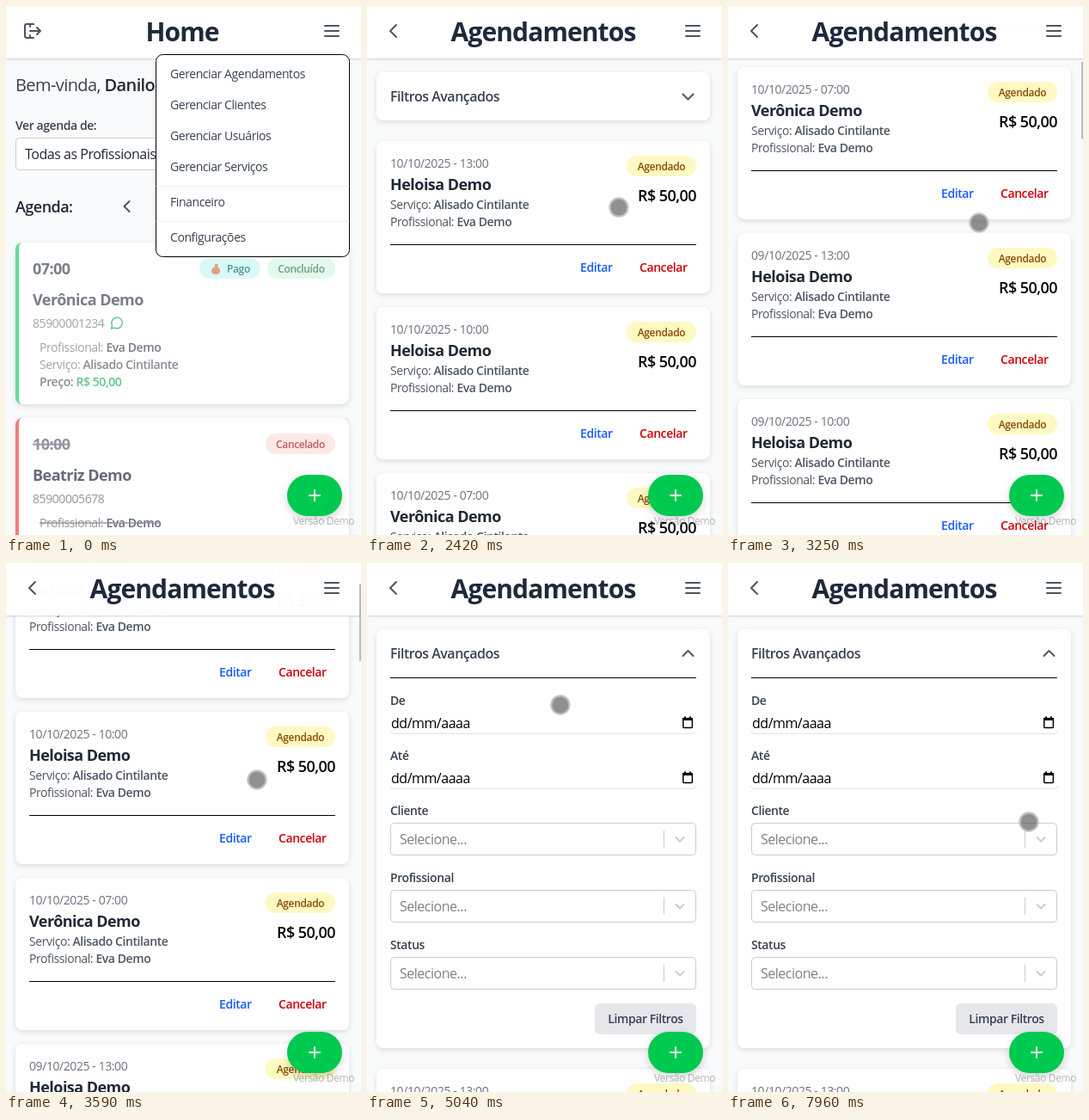
Recreate the animation shown at these times as an HTML page. Size 413x615 px, loop 8 s.

```html
<!DOCTYPE html>
<html lang="pt-BR">
<head>
<meta charset="utf-8">
<title>Agendamentos</title>
<style>
html, body { margin: 0; width: 100%; height: 100%; overflow: hidden; background: #f9fafb; }
svg { display: block; width: 413px; height: 615px; font-family: "Open Sans", "Noto Sans", sans-serif; }
text { letter-spacing: -.03em; white-space: pre; }
.icon { fill: none; stroke: #4b5563; stroke-width: 2; stroke-linecap: round; stroke-linejoin: round; }
.card { filter: drop-shadow(0 2px 3px rgba(0,0,0,.12)); }
.fab { filter: drop-shadow(0 4px 5px rgba(0,0,0,.16)); }
.struck { text-decoration: line-through; }
</style>
</head>
<body>
<svg id="stage" viewBox="0 0 413 615"></svg>
<script>
const INK = '#1f2937', SLATE = '#374151', GRAY = '#4b5563';
const SERVICE = 'Alisado Cintilante', STAFF = 'Eva Demo';
const LOOP = 8000, STEP = 69.43;

const text = (x, y, size, fill, str, weight = 400, more = '') =>
  `<text x="${x}" y="${y}" font-size="${size}" fill="${fill}" font-weight="${weight}" ${more}>${str}</text>`;
const bold = (str, fill) => `<tspan font-weight="600" ${fill ? `fill="${fill}"` : ''}>${str}</tspan>`;
const rect = (x, y, w, h, r, fill, more = '') =>
  `<rect x="${x}" y="${y}" width="${w}" height="${h}" rx="${r}" fill="${fill}" ${more}/>`;
const icon = (d, more = '') => `<path class="icon" d="${d}" ${more}/>`;
const group = (id, body) => `<g id="${id}">${body}</g>`;
const END = 'text-anchor="end"', MID = 'text-anchor="middle"', CARD = 'class="card"';

const pill = (x, y, w, bg, fg, label) =>
  rect(x, y, w, 24, 12, bg) + text(x + w / 2, y + 17, 12, fg, label, 600, MID);

// Home
function menu() {
  const items = ['Gerenciar Agendamentos', 'Gerenciar Clientes', 'Gerenciar Usuários',
    'Gerenciar Serviços', 'Financeiro', 'Configurações'];
  const lines = [84, 120, 156, 192, 233, 274];
  return rect(174.5, 56.5, 225, 235, 8, '#fff', 'stroke="#000"') +
    icon('M175 209.5H399M175 250.5H399', 'style="stroke:#f0f2f4;stroke-width:1"') +
    items.map((s, i) => text(191, lines[i], 14, SLATE, s)).join('');
}

function visit(y, edge, time, name, phone, tone, soft, struck = '') {
  return rect(11, y, 388, 188, 8, edge, CARD) +
    `<path d="M19 ${y}H391a8 8 0 0 1 8 8V${y + 180}a8 8 0 0 1-8 8H19q-4 0-4-8V${y + 8}q0-8 4-8Z" fill="#fff"/>` +
    text(31, y + 37, 18, struck ? soft : tone, time, 700, struck) +
    text(31, y + 73, 18, tone, name, 700) +
    text(31, y + 99, 14, soft, phone) +
    text(39, y + 127, 14, soft, 'Profissional: ' + bold(STAFF, tone), 400, struck);
}

const home =
  text(11, 99, 20, SLATE, 'Bem-vinda, ' + bold('Danilo', INK)) +
  text(11, 144, 14, SLATE, 'Ver agenda de:', 600) +
  rect(11.5, 153.5, 387, 37, 4, '#fff', 'stroke="#ccc"') +
  text(22, 178, 16, INK, 'Todas as Profissionais') +
  text(11, 240, 18, INK, 'Agenda:', 600) +
  icon('M143.5 227l-6 6 6 6', 'stroke-width="1.8"') +
  visit(275, '#61dd94', '07:00', 'Verônica Demo', '85900001234', '#797f87', '#a0a4ab') +
  pill(304, 293, 79, '#e3f9ec', '#6a9f80', 'Concluído') +
  rect(225, 293, 71, 24, 12, '#d9f9f5') +
  text(257, 310, 12, '#4f9690', 'Pago', 600) +
  '<path d="M243 300l4 0-1 3q4 3 3 6-1 3-5 3-5 0-5-4 0-3 4-5Z" fill="#dfa184"/>' +
  icon('M126 374l-3.5 1 1-3.5a6.3 6.3 0 1 1 2.5 2.5Z', 'style="stroke:#5fc58a;stroke-width:1.4"') +
  text(39, 422, 14, '#a0a4ab', 'Serviço: ' + bold(SERVICE, '#888e97')) +
  text(39, 442, 14, '#888e97', 'Preço: <tspan fill="#60c48b">R$ 50,00</tspan>', 600) +
  visit(479, '#f57b7e', '10:00', 'Beatriz Demo', '85900005678', '#656b76', '#92969e', 'class="struck"') +
  pill(302, 497, 81, '#fde8e8', '#c05b5b', 'Cancelado');

// Appointment list
function booking(i) {
  const y = 157 + 193 * i;
  const day = String(10 - Math.floor(i / 3)).padStart(2, '0');
  const hour = ['13:00', '10:00', '07:00'][i % 3];
  return rect(11, y, 388, 177, 8, '#fff', CARD) +
    text(27, y + 31, 14, '#6b7280', `${day}/10/2025 - ${hour}`) +
    text(27, y + 57, 18, INK, i % 3 == 2 ? 'Verônica Demo' : 'Heloisa Demo', 700) +
    text(27, y + 79, 14, GRAY, 'Serviço: ' + bold(SERVICE)) +
    text(27, y + 99, 14, GRAY, 'Profissional: ' + bold(STAFF)) +
    pill(302, y + 17, 81, '#fef9c2', '#894b00', 'Agendado') +
    text(383, y + 70, 18, '#000', 'R$ 50,00', 600, END) +
    rect(27, y + 120, 356, 1, 0, '#000') +
    text(248, y + 152, 14, '#155dfc', 'Editar', 600) +
    text(317, y + 152, 14, '#d0000b', 'Cancelar', 600);
}

const dateField = (label, y) =>
  text(27, y, 14, SLATE, label, 600) +
  text(28, y + 27, 16, '#000', 'dd/mm/aaaa') +
  `<path d="M27 ${y + 30}q0 3.5 4 3.5H379q4 0 4-3.5" fill="none" stroke="#e2e4e8"/>` +
  rect(367.8, y + 15.8, 10.6, 10.6, 1, 'none', 'stroke="#000" stroke-width="1.5"') +
  `<path d="M367 ${y + 15}h12v3h-12zM369 ${y + 13.5}h2v2h-2zM375 ${y + 13.5}h2v2h-2z"/>`;

const choice = (label, y) =>
  text(27, y, 14, SLATE, label, 600) +
  rect(27.5, y + 9.5, 355, 37, 4, '#fff', 'stroke="#ccc"') +
  text(38, y + 34, 16, '#808080', 'Selecione...') +
  rect(345, y + 18, 1, 20, 0, '#ccc') +
  icon(`M359.5 ${y + 26}l4.5 4.5 4.5-4.5`, 'style="stroke:#ccc"');

const filterTitle = text(27, 111, 16, SLATE, 'Filtros Avançados', 600);
const closed = rect(11, 77, 388, 56, 8, '#fff', CARD) + filterTitle + icon('M367.5 102.5l6 6 6-6');
const opened = rect(11, 77, 388, 487, 8, '#fff', CARD) + filterTitle + icon('M367.5 108l6-6 6 6') +
  rect(27, 133, 356, 1, 0, '#000') +
  dateField('De', 165) + dateField('Até', 229) +
  choice('Cliente', 293) + choice('Profissional', 371) + choice('Status', 449) +
  rect(265, 512, 118, 36, 6, '#e5e7eb') +
  text(324, 535, 14, SLATE, 'Limpar Filtros', 600, MID);

// Date popup: October 2025, weeks start on Sunday
function calendar() {
  let out = rect(27.5, 199.5, 232, 279, 4, '#fff', 'stroke="#bfbfbf"') +
    text(41, 222, 13, '#101010', 'outubro de 2025 ▾', 600) +
    icon('M215 222v-9m-4 4l4-4 4 4M240 213v9m-4-4l4 4 4-4', 'style="stroke:#333;stroke-width:1.4"');
  [...'DSTQQSS'].forEach((s, i) => out += text(50 + 31 * i, 250, 12, '#101010', s, 400, MID));
  for (let i = 0; i < 42; i++) {
    const d = i - 2, inside = d > 0 && d < 32;
    out += text(50 + 31 * (i % 7), 276 + 31 * Math.floor(i / 7), 12, inside ? '#101010' : '#999',
      d < 1 ? d + 30 : d > 31 ? d - 31 : d, 400, MID);
  }
  return out + text(41, 468, 12, '#1a73e8', 'Limpar') + text(246, 468, 12, '#1a73e8', 'Hoje', 400, END);
}

const title = s => text(205, 41, 30, '#1e293b', s, 700, MID);
const bookings = Array.from({ length: 7 }, (_, i) => booking(i)).join('');

stage.innerHTML =
  group('homePage', home) +
  group('listPage', group('shutPanel', closed) + group('openPanel', opened) + group('cards', bookings)) +
  rect(0, 0, 413, 61, 0, '#fff', 'fill-opacity=".985" style="filter:drop-shadow(0 1px 1px rgba(0,0,0,.18))"') +
  group('homeHead', title('Home') +
    icon('M28 21h-4q-2 0-2 2v12q0 2 2 2h4M32 21h-4q0 0 0 3M28 34q0 3 0 3h4M28 29h12m-4-4l4 4-4 4')) +
  group('listHead', title('Agendamentos') + icon('M34 22l-7 7 7 7')) +
  icon('M371 23h16M371 29h16M371 35h16') +
  group('menuBox', menu()) +
  rect(411, 0, 2, 90, 1, '#b9bbbe', 'id="thumb"') +
  group('picker', calendar()) +
  rect(327, 545, 64, 48, 24, '#00c950', 'class="fab"') +
  icon('M359 563v12M353 569h12', 'style="stroke:#fff"') +
  text(334, 603, 12, '#8a8f98', 'Versão Demo', 400, 'opacity=".65"') +
  '<circle id="dot" r="10.5" stroke-width="2.5"/>';

// Key points: time followed by values
const cursorPath = [
  [650, 430, 130], [1150, 292, 80], [2000, 292, 80], [2400, 293, 233], [2500, 292, 252],
  [3800, 292, 252], [4210, 341, 196], [4480, 350, 115], [4600, 350, 115], [5310, 150, 195],
  [5650, 250, 148], [5950, 382, 200], [6080, 372, 183], [6750, 372, 183], [6950, 374, 252],
  [7480, 374, 252], [7940, 350, 301]];
const scrollPath = [[2440, 0], [2890, 261], [3240, 473], [3380, 510], [3640, 90], [3860, 0]];
const clicks = [[1200, 1400], [4430, 4560], [6120, 6290], [7000, 7200]];

function along(path, t) {
  const n = path.findIndex(p => p[0] > t);
  if (n < 1) return path.at(n).slice(1);
  const a = path[n - 1], b = path[n], k = (t - a[0]) / (b[0] - a[0]);
  return a.slice(1).map((v, i) => v + (b[i + 1] - v) * k);
}
const during = (t, from, to) => t >= from && t < to;
const show = (el, on) => el.style.display = on ? '' : 'none';
const shift = (el, y) => el.setAttribute('transform', `translate(0 ${y})`);

function draw(now) {
  const t = now % LOOP;
  const s = t < 670 ? 0 : 670 + Math.floor((t - 660) / STEP) * STEP;
  const atHome = t < 1360, expanded = t >= 4560;
  const scroll = Math.round(along(scrollPath, s)[0]);
  const [x, y] = along(cursorPath, s);
  const pressed = clicks.some(c => during(t, ...c));

  [homePage, homeHead, menuBox].forEach(el => show(el, atHome));
  [listPage, listHead].forEach(el => show(el, !atHome));
  show(cards, t >= 1690);
  show(shutPanel, !expanded);
  show(openPanel, expanded);
  shift(cards, expanded ? 431 : 0);
  shift(listPage, -scroll);

  shift(thumb, scroll * .137);
  thumb.style.opacity = during(t, 2440, 3900) ? 1 : during(t, 3900, 4400) ? (4400 - t) / 500 : 0;

  show(picker, during(t, 6290, 6800) || during(t, 7010, 7540));
  shift(picker, t > 7000 ? 64 : 0);

  dot.setAttribute('cx', x);
  dot.setAttribute('cy', y);
  dot.setAttribute('fill', pressed ? 'rgba(184,174,0,.72)' : 'rgba(92,92,92,.68)');
  dot.setAttribute('stroke', pressed ? 'rgba(222,214,60,.8)' : 'rgba(190,190,190,.85)');
  show(dot, t >= 670);
  requestAnimationFrame(draw);
}

requestAnimationFrame(draw);
</script>
</body>
</html>
```
